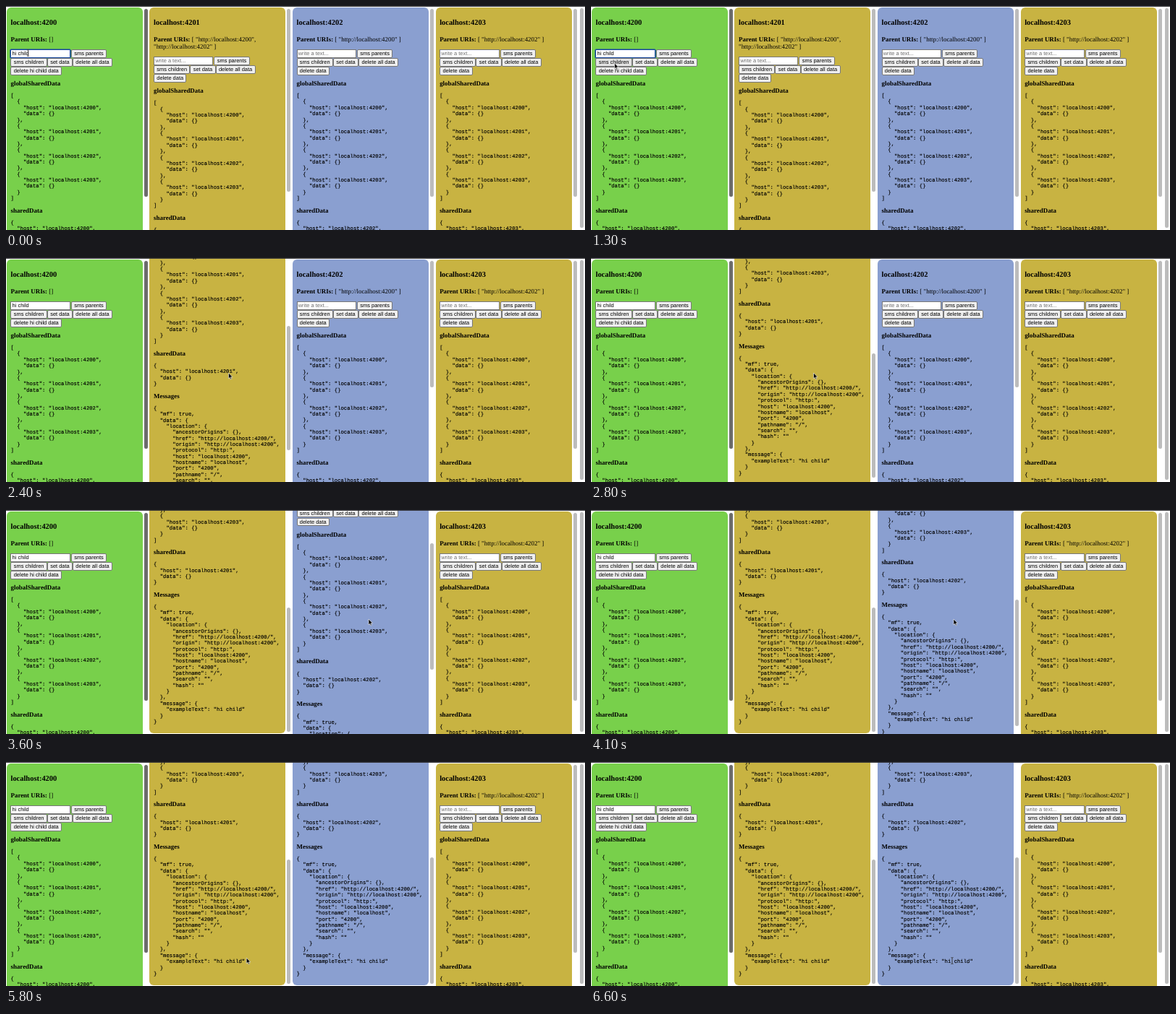
Animation of 800x310 px, one loop 6700 ms. Source, as an HTML page:

```html
<!DOCTYPE html>
<html lang="en">
<head>
<meta charset="utf-8">
<title>Shared data between frames</title>
<style>
html, body { margin: 0; width: 100%; height: 100%; overflow: hidden; background: #fff; }
#stage { position: relative; width: 800px; height: 310px; overflow: hidden; background: #fff; color: #000; text-rendering: geometricPrecision; }
#stage > *, .page, .page > * { position: absolute; }
#topline { left: 0; top: 0; width: 800px; height: 1px; background: #303034; }
.view { top: 1px; width: 190px; height: 309px; overflow: hidden; }
.page { left: 0; width: 188px; border-radius: 6px; }
h3, h4, p, pre { margin: 0; left: 5.6px; white-space: pre; }
h3, h4, p { font: 8.92px/10px "Liberation Serif", Times, serif; }
h3, h4 { font-weight: bold; }
h3 { font-size: 10.44px; }
pre { font: 7.25px/8.366px "Liberation Mono", Courier, monospace; -webkit-text-stroke: .15px #000; }
.row { left: 5.5px; display: flex; white-space: pre; }
.row span { box-sizing: border-box; height: 11.5px; border: 1px solid #777; border-radius: 2px; padding: 0 3.35px; background: #efefef; font: 7.44px/9.4px "Liberation Sans", Arial, sans-serif; }
.row .field { width: 82.5px; margin-right: 1px; padding: 0 1.2px; border-radius: 0; background: #fff; }
.row .empty { color: #6c6c6c; }
.row .focus { border-color: #14459f; border-radius: 1px; box-shadow: 0 0 0 .6px #14459f; }
.row .hover { background: #e3e3e3; }
.bar { width: 5px; border-radius: 2.5px; background: #bcbcbc; }
#pointer { left: 0; top: 0; overflow: visible; }
</style>
</head>
<body>
<div id="stage">
  <div id="topline"></div>
</div>
<script>
const LOOP = 6700, STEP = 100, VIEW = 309, PITCH = 197.55;
const BLUR = 1500, ARRIVE = 1600;
const LINE = 8.366, TRACK_TOP = 4, TRACK = 303;
const stage = document.getElementById('stage');
const hosts = [0, 1, 2, 3].map(i => 'localhost:420' + i);
const json = v => JSON.stringify(v, null, 2);
const entry = host => ({ host, data: {} });

const message = {
  mf: true,
  data: {
    location: {
      ancestorOrigins: {},
      href: 'http://localhost:4200/',
      origin: 'http://localhost:4200',
      protocol: 'http:',
      host: 'localhost:4200',
      hostname: 'localhost',
      port: '4200',
      pathname: '/',
      search: '',
      hash: ''
    }
  },
  message: { exampleText: 'hi child' }
};

function add(parent, tag, text, css, cls) {
  const el = document.createElement(tag);
  if (text) el.textContent = text;
  if (cls) el.className = cls;
  Object.assign(el.style, css);
  parent.append(el);
  return el;
}

function makePanel(i, color, uris, value) {
  const x = 0.9 + i * PITCH;
  const shift = (uris.length - 1) * 10.2;
  const view = add(stage, 'div', '', { left: x + 'px' }, 'view');
  const page = add(view, 'div', '', { background: color }, 'page');
  // Page begins at stage y = 2
  const put = (tag, y, text, cls) => add(page, tag, text, { top: y - 2 + 'px' }, cls);

  put('h3', 19.4, hosts[i]);
  const line = put('p', 41.2);
  add(line, 'b', 'Parent URIs:');
  line.append(' ' + uris[0]);
  if (uris[1]) put('p', 51.4, uris[1]);

  const row = (y, labels) => {
    const box = put('div', y + shift, '', 'row');
    return labels.map(s => add(box, 'span', s));
  };
  const [field] = row(60, [value || 'write a text...', 'sms parents']);
  field.className = value ? 'field' : 'field empty';
  const [send] = row(72, ['sms children', 'set data', 'delete all data']);
  row(84, [value ? `delete ${value} data` : 'delete data']);

  let y = 102 + shift;
  const section = (title, data) => {
    const text = json(data);
    put('h4', y, title);
    const block = put('pre', y + 19.1, text);
    y += 25.2 + text.split('\n').length * LINE;
    return block;
  };
  section('globalSharedData', hosts.map(entry));
  section('sharedData', entry(hosts[i]));
  const log = section('Messages', message);

  const bar = add(stage, 'div', '', { left: x + 190 + 'px' }, 'bar');
  return { page, log, bar, field, send, shift };
}

const GOLD = '#c8b342';
const panels = [
  makePanel(0, '#78d04b', ['[]'], 'hi child'),
  makePanel(1, GOLD, ['[ "http://localhost:4200",', '"http://localhost:4202" ]']),
  makePanel(2, '#8a9fd0', ['[ "http://localhost:4200" ]']),
  makePanel(3, GOLD, ['[ "http://localhost:4202" ]'])
];
panels[0].bar.style.background = '#6c6c6c';
add(stage, 'div', '', { left: '793px', top: '3px', height: '304px' }, 'bar');

stage.insertAdjacentHTML('beforeend', `
<svg id="pointer" width="12" height="12">
  <path id="arrow" d="M0 0V7.9L1.8 6.3L3 9L4.3 8.4L3.1 5.8H5.6Z" fill="#000" stroke="#fff" stroke-width=".6"/>
  <path id="beam" d="M-1.5 -4.5Q0 -4.5 0 -3.5Q0 -4.5 1.5 -4.5M0 -3.5V3.5M-1.5 4.5Q0 4.5 0 3.5Q0 4.5 1.5 4.5" fill="none" stroke="#333" stroke-width=".9"/>
</svg>`);
const [pointer, arrow, beam] = ['pointer', 'arrow', 'beam'].map(id => document.getElementById(id));

// time, x, y
const path = [
  [0, 30.5, 65], [300, 30.5, 65], [900, 32.5, 79], [1500, 32.5, 79],
  [2000, 307.5, 159], [3000, 307.5, 159], [3400, 501, 151], [4300, 501, 151],
  [4900, 291, 270], [5600, 291, 270], [6300, 499, 275], [LOOP, 499, 275]
];

function pointerAt(t) {
  const k = path.findIndex(p => p[0] > t);
  const [a, b] = [path[k - 1], path[k]];
  const p = (t - a[0]) / (b[0] - a[0]);
  const e = p * p * (3 - 2 * p);
  return [a[1] + (b[1] - a[1]) * e, a[2] + (b[2] - a[2]) * e];
}

function easeOut(t, start, span, power) {
  const p = Math.min(1, Math.max(0, (t - start) / span));
  return 1 - Math.pow(1 - p, power);
}

function draw(t) {
  const scroll = [0, easeOut(t, 2050, 950, 2.52), easeOut(t, 3450, 900, 2.17), 0];
  panels.forEach((p, i) => {
    const got = t >= ARRIVE && (i === 1 || i === 2);
    const full = (got ? 533.5 : 360) + p.shift;
    const y = scroll[i] * (full - VIEW);
    p.log.style.display = got ? '' : 'none';
    p.page.style.height = full - 2 + 'px';
    p.page.style.top = 1 - y + 'px';
    p.bar.style.top = TRACK_TOP + TRACK * y / full + 'px';
    p.bar.style.height = TRACK * VIEW / full + 'px';
  });

  const [x, y] = pointerAt(t);
  panels[0].field.classList.toggle('focus', t < BLUR);
  panels[0].send.classList.toggle('hover', x < 57 && y > 72 && y < 84);
  const overText = t < 400 || t >= 6300;
  arrow.style.display = overText ? 'none' : '';
  beam.style.display = overText ? '' : 'none';
  pointer.style.transform = `translate(${x}px, ${y}px)`;
}

const begin = performance.now();
function tick() {
  const t = (performance.now() - begin) % LOOP;
  draw(Math.floor(t / STEP) * STEP);
  requestAnimationFrame(tick);
}
tick();
</script>
</body>
</html>
```
